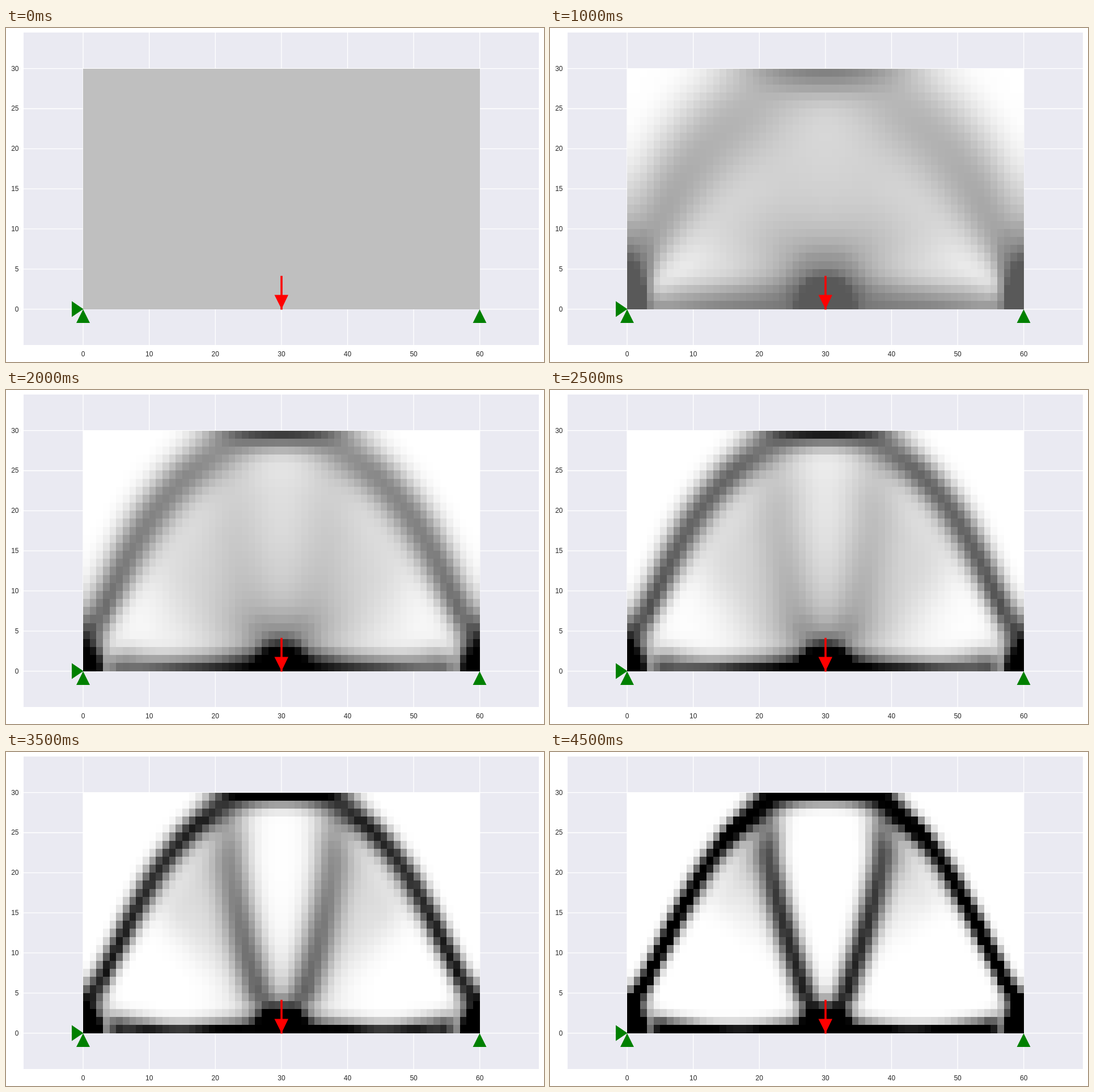
Animation of 949 by 590 pixels, one loop 7 s. Source, as an HTML page with a canvas:

```html
<!DOCTYPE html>
<html lang="en">
<head>
<meta charset="utf-8">
<title>Topology optimization of a beam</title>
<style>
html, body { margin: 0; width: 100%; height: 100%; overflow: hidden; background: #fff; }
svg, canvas { position: absolute; left: 0; top: 0; display: block; }
text { font: 12px Arial, "Liberation Sans", sans-serif; fill: #262626; }
</style>
</head>
<body>
<svg id="plot" width="949" height="590">
  <rect x="31" y="8" width="909" height="552" fill="#eaeaf2"/>
</svg>
<canvas id="field" width="949" height="590"></canvas>
<svg width="949" height="590">
  <path fill="#008000" d="M116 482.5 136.5 496.5 116 510.5ZM136 497 148 521H124ZM835.5 497 847.5 521H823.5Z"/>
  <path stroke="#f00" stroke-width="3.6" d="M486 437.8V497.5"/>
  <path fill="#f00" d="M473.5 471.5H498L486 496.5Z"/>
</svg>
<script>
const NX = 60, NY = 30, VOLUME = 0.25, PENAL = 3, RADIUS = 3, MOVE = 0.2, FLOOR = 0.001;
const STEPS = 9, STEP_MS = 500, LOOP_MS = 7000;
const px = x => 136.1 + x * 11.66;
const py = y => 496.6 - y * 14.165;

// Axes
const plot = document.getElementById('plot');
function add(tag, attrs, text = '') {
  const el = document.createElementNS('http://www.w3.org/2000/svg', tag);
  for (const key in attrs) el.setAttribute(key, attrs[key]);
  el.textContent = text;
  plot.append(el);
}
const gridLine = d => add('path', { d, stroke: '#fff', 'stroke-width': 1.3 });
for (let x = 0; x <= NX; x += 10) {
  gridLine(`M${px(x)} 8V560`);
  add('text', { x: px(x), y: 579.6, 'text-anchor': 'middle' }, x);
}
for (let y = 0; y <= NY; y += 5) {
  gridLine(`M31 ${py(y)}H940`);
  add('text', { x: 22.5, y: py(y) + 4, 'text-anchor': 'end' }, y);
}

// Stiffness of a unit square in plane stress, nodes counter-clockwise
const nu = 0.3;
const k = [1 / 2 - nu / 6, 1 / 8 + nu / 8, -1 / 4 - nu / 12, -1 / 8 + 3 * nu / 8,
  -1 / 4 + nu / 12, -1 / 8 - nu / 8, nu / 6, 1 / 8 - 3 * nu / 8].map(v => v / (1 - nu * nu));
const KE = ['01234567', '10765432', '27056341', '36507214',
  '45670123', '54321076', '63412705', '72143650'].map(row => [...row].map(i => k[i]));

const ROWS = NY + 1, DOFS = 2 * (NX + 1) * ROWS, BAND = 2 * ROWS + 3;
const node = (i, j) => i * ROWS + j;
const cell = (i, j) => i * NY + j;

function eachCell(fn) {
  for (let i = 0; i < NX; i++) for (let j = 0; j < NY; j++) fn(i, j, cell(i, j));
}

function cellDofs(i, j) {
  const n = node(i, j);
  return [n, n + ROWS, n + ROWS + 1, n + 1].flatMap(m => [2 * m, 2 * m + 1]);
}

// Displacements by banded Cholesky; entry (r, c) is stored at r * BAND + c + BAND
function solve(x) {
  const L = new Float64Array(DOFS * (BAND + 1)), u = new Float64Array(DOFS);
  eachCell((i, j, e) => {
    const dofs = cellDofs(i, j), E = x[e] ** PENAL;
    dofs.forEach((r, a) => dofs.forEach((c, b) => {
      if (c <= r) L[r * BAND + c + BAND] += E * KE[a][b];
    }));
  });
  const right = 2 * node(NX, 0) + 1;
  for (const d of [0, 1, right]) L[d * BAND + d + BAND] += 1e9;
  u[2 * node(NX / 2, 0) + 1] = -1;

  for (let r = 0; r < DOFS; r++) {
    const first = Math.max(0, r - BAND), rowR = r * BAND + BAND;
    for (let c = first; c <= r; c++) {
      const rowC = c * BAND + BAND;
      let s = L[rowR + c];
      for (let m = first; m < c; m++) s -= L[rowR + m] * L[rowC + m];
      L[rowR + c] = c < r ? s / L[rowC + c] : Math.sqrt(s);
    }
    for (let c = first; c < r; c++) u[r] -= L[rowR + c] * u[c];
    u[r] /= L[rowR + r];
  }
  for (let r = DOFS - 1; r >= 0; r--) {
    const rowR = r * BAND + BAND;
    u[r] /= L[rowR + r];
    for (let c = Math.max(0, r - BAND); c < r; c++) u[c] -= L[rowR + c] * u[r];
  }
  return u;
}

// Strain energy per cell, averaged with a cone filter
function sensitivity(x) {
  const u = solve(x), energy = new Float64Array(x.length), smooth = new Float64Array(x.length);
  eachCell((i, j, e) => {
    const ue = cellDofs(i, j).map(d => u[d]);
    let sum = 0;
    for (let a = 0; a < 8; a++) for (let b = 0; b < 8; b++) sum += ue[a] * KE[a][b] * ue[b];
    energy[e] = x[e] ** PENAL * sum;
  });
  const reach = Math.floor(RADIUS);
  eachCell((i, j, e) => {
    let sum = 0, total = 0;
    for (let p = Math.max(0, i - reach); p <= Math.min(NX - 1, i + reach); p++) {
      for (let q = Math.max(0, j - reach); q <= Math.min(NY - 1, j + reach); q++) {
        const w = Math.max(0, RADIUS - Math.hypot(i - p, j - q));
        total += w;
        sum += w * energy[cell(p, q)];
      }
    }
    smooth[e] = sum / total;
  });
  return smooth;
}

// Optimality criteria update that keeps the volume constant
function improve(x) {
  const gain = sensitivity(x);
  let lo = 0, hi = 1e6, next;
  for (let n = 0; n < 70; n++) {
    const mid = (lo + hi) / 2;
    next = x.map((v, e) => Math.max(FLOOR, v - MOVE,
      Math.min(1, v + MOVE, v * Math.sqrt(gain[e] / mid))));
    if (next.reduce((a, b) => a + b) > VOLUME * x.length) lo = mid; else hi = mid;
  }
  return next;
}

const states = [new Float64Array(NX * NY).fill(VOLUME)];
while (states.length <= STEPS) states.push(improve(states[states.length - 1]));

const ctx = document.getElementById('field').getContext('2d');
function paint(x) {
  eachCell((i, j, e) => {
    const left = Math.round(px(i)), top = Math.round(py(j + 1));
    const shade = 255 - Math.min(255, Math.floor(x[e] * 256));
    ctx.fillStyle = `rgb(${shade},${shade},${shade})`;
    ctx.fillRect(left, top, Math.round(px(i + 1)) - left, Math.round(py(j)) - top);
  });
}

let shown = -1;
function tick() {
  const step = Math.min(STEPS, Math.floor(performance.now() % LOOP_MS / STEP_MS));
  if (step !== shown) paint(states[shown = step]);
  requestAnimationFrame(tick);
}
tick();
</script>
</body>
</html>
```
